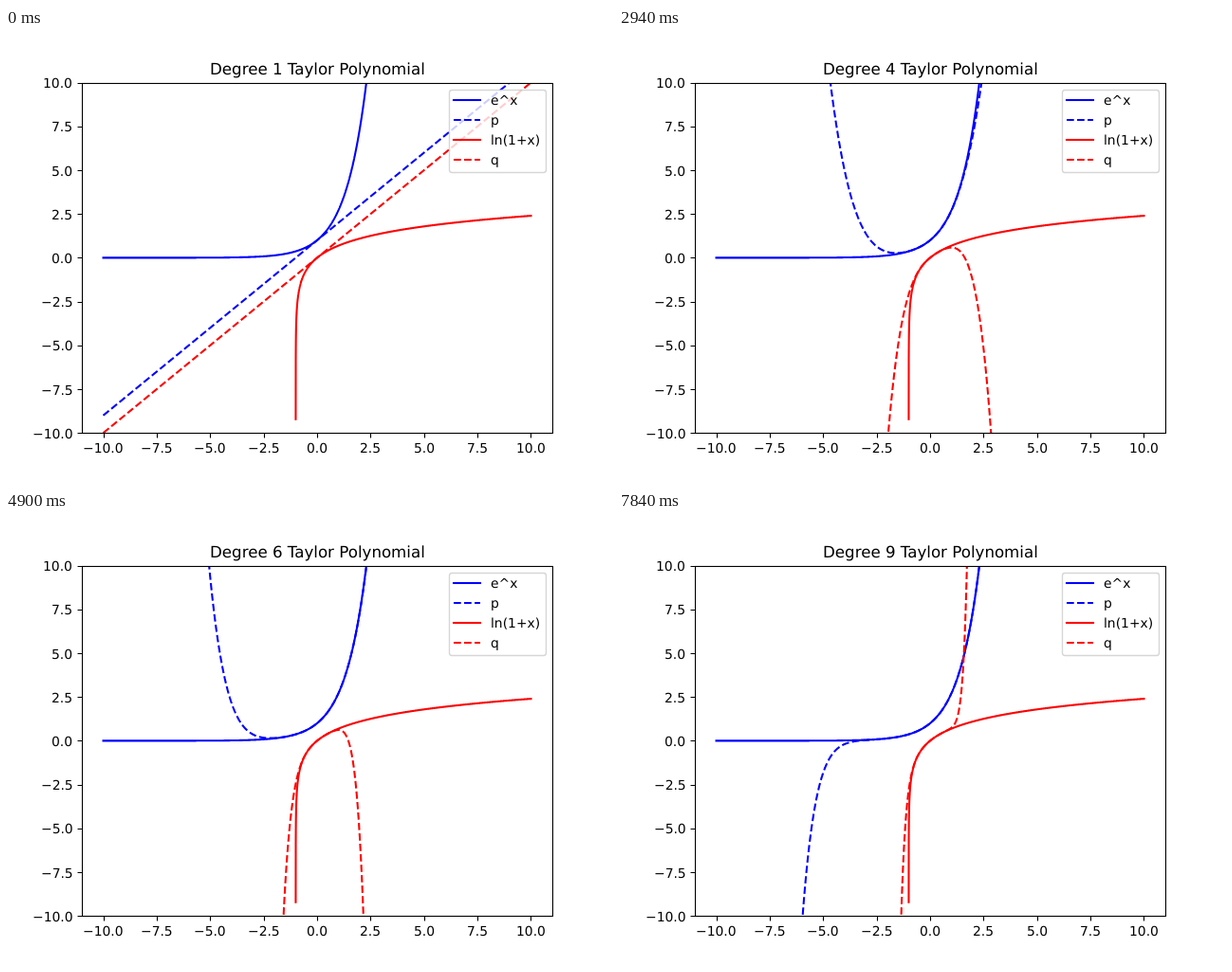
Write an HTML page that moves like this. It is 640 px wide and 480 px high and loops after 8000 ms.

```html
<!DOCTYPE html>
<html lang="en">
<head>
<meta charset="utf-8">
<title>Taylor polynomials</title>
<style>
  html, body { margin: 0; width: 100%; height: 100%; overflow: hidden; background: #fff; }
  svg { display: block; }
  text { font: 13.889px "DejaVu Sans", sans-serif; text-rendering: geometricPrecision; }
  #title { font-size: 16.667px; }
  .line { fill: none; stroke-width: 2.083; stroke-linejoin: round; stroke-linecap: square; }
  .dash { stroke-dasharray: 7.708 3.333; stroke-linecap: butt; }
  .blue { stroke: #00f; }
  .red { stroke: #f00; }
  .axis { fill: none; stroke: #000; stroke-width: 1.111; }
</style>
</head>
<body>
<svg width="640" height="480" viewBox="0 0 640 480">
  <clipPath id="area"><rect x="80" y="58" width="497" height="370"/></clipPath>
  <g id="curves" clip-path="url(#area)"></g>
  <g id="axes"></g>
  <rect class="axis" x="80.5" y="58.5" width="496" height="369"/>
  <text id="title"></text>
  <g id="legend">
    <rect x="467.5" y="65.5" width="102" height="87" rx="2.78" fill="#fff" stroke="#ccc"
          stroke-width="1.389" fill-opacity=".8" stroke-opacity=".8"/>
  </g>
</svg>
<script>
const STEP = 980, LOOP = 8000;
const $ = id => document.getElementById(id);
const px = x => 328 + x * 496 / 22;
const py = y => 242.4 - y * 18.48;

function add(parent, tag, attrs, text) {
  const el = document.createElementNS('http://www.w3.org/2000/svg', tag);
  for (const k in attrs) el.setAttribute(k, attrs[k]);
  if (text) el.textContent = text;
  return parent.appendChild(el);
}

// Place text on whole pixels; align is the share of its width left of x.
function place(el, x, y, align) {
  el.setAttribute('x', Math.round(x - align * el.getComputedTextLength()));
  el.setAttribute('y', Math.round(y));
}

// Polyline of f on [from, 10], cut at the stage edges so dashes start there.
function trace(f, from = -10) {
  const n = 4000, top = -1, bottom = 481;
  const pt = (c, x, y) => c + x.toFixed(2) + ' ' + y.toFixed(2);
  let d = '', last = null;
  for (let i = 0; i <= n; i++) {
    const v = from + (10 - from) * i / n;
    const p = { x: px(v), y: py(f(v)) };
    p.in = p.y >= top && p.y <= bottom;
    if (last && p.in !== last.in) {
      const out = p.in ? last : p;
      const edge = out.y < top ? top : bottom;
      const k = (edge - last.y) / (p.y - last.y);
      d += pt(p.in ? 'M' : 'L', last.x + (p.x - last.x) * k, edge);
    }
    if (p.in) d += pt(d ? 'L' : 'M', p.x, p.y);
    last = p;
  }
  return d;
}

function expSeries(x, deg) {
  let sum = 1, term = 1;
  for (let k = 1; k <= deg; k++) sum += term *= x / k;
  return sum;
}

function logSeries(x, deg) {
  let sum = 0, power = -1;
  for (let k = 1; k <= deg; k++) sum += (power *= -x) / k;
  return sum;
}

const curve = (cls, d = '') => add($('curves'), 'path', { class: 'line ' + cls, d });
curve('blue', trace(Math.exp));
const p = curve('blue dash');
curve('red', trace(x => Math.log(1 + x), -0.9999));
const q = curve('red dash');

for (let v = -10; v <= 10; v += 2.5) {
  const label = v.toFixed(1).replace('-', '\u2212');
  const x = Math.round(px(v)) + 0.5, y = Math.round(py(v)) + 0.5;
  add($('axes'), 'path', { class: 'axis', d: `M${x} 427.5v5M80.5 ${y}h-5` });
  place(add($('axes'), 'text', {}, label), px(v), 448, 0.5);
  place(add($('axes'), 'text', {}, label), 70.28, py(v) + 5.5, 1);
}

[['e^x', 'blue'], ['p', 'blue dash'], ['ln(1+x)', 'red'], ['q', 'red dash']].forEach(([name, cls], i) => {
  const y = 76 + 21 * i;
  add($('legend'), 'path', { class: 'line ' + cls, d: `M472 ${y}H500` });
  add($('legend'), 'text', { x: 511, y: y + 5 }, name);
});

const frames = Array.from({ length: 9 }, (_, i) => ({
  p: trace(x => expSeries(x, i + 1)),
  q: trace(x => logSeries(x, i + 1))
}));

let shown = 0;
function draw() {
  const deg = 1 + Math.floor(performance.now() % LOOP / STEP);
  if (deg !== shown) {
    shown = deg;
    p.setAttribute('d', frames[deg - 1].p);
    q.setAttribute('d', frames[deg - 1].q);
    $('title').textContent = `Degree ${deg} Taylor Polynomial`;
    place($('title'), 328, 49, 0.5);
  }
  requestAnimationFrame(draw);
}
draw();
</script>
</body>
</html>
```
